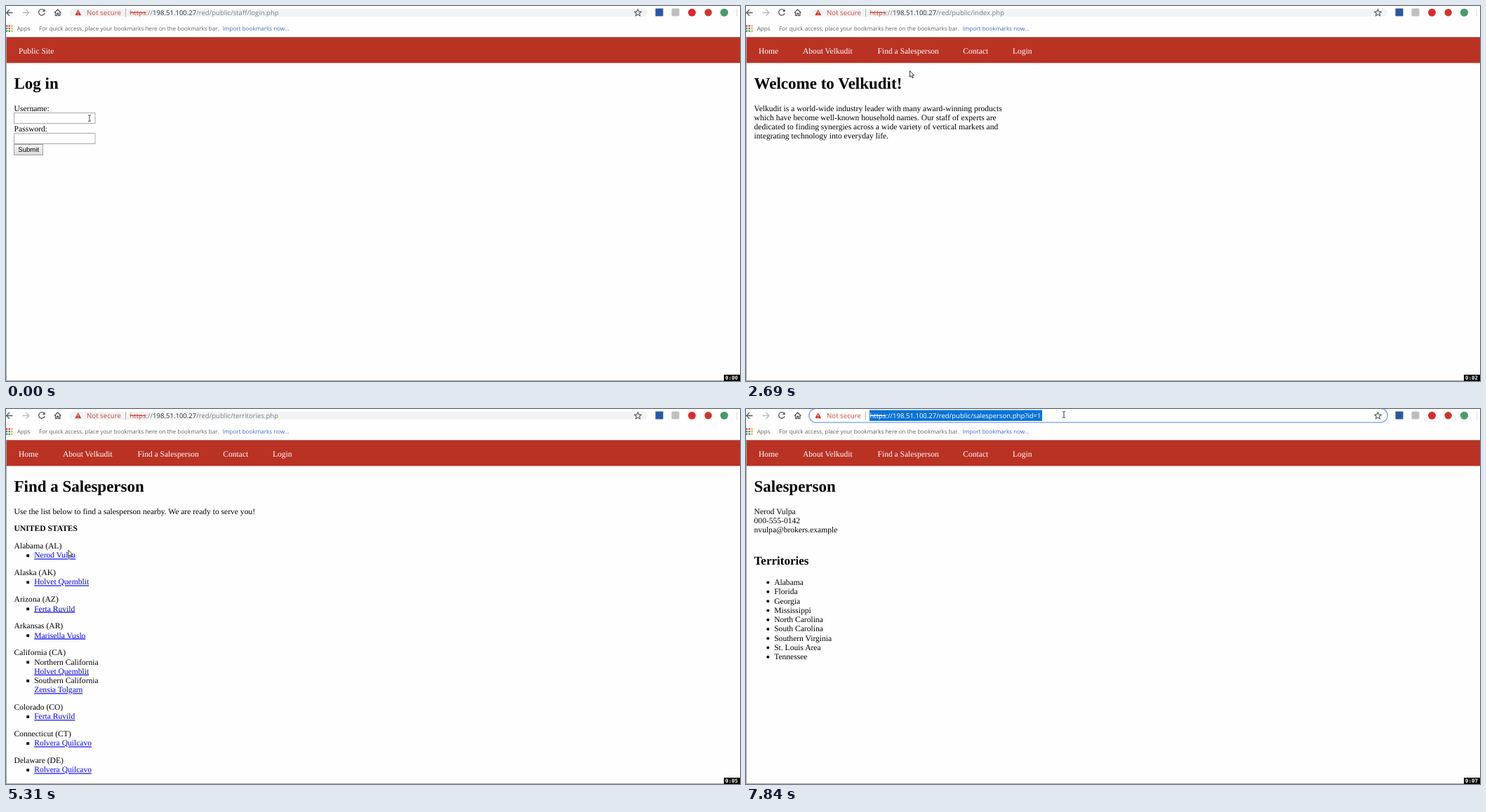
Write an HTML page that moves like this. It is 1046 px wide and 535 px high and loops after 8000 ms.

```html
<!DOCTYPE html>
<html lang="en">
<head>
<meta charset="utf-8">
<title>Browsing session</title>
<style>
  html, body { margin: 0; width: 100%; height: 100%; overflow: hidden; background: #fefefe; }
  svg { display: block; width: 1046px; height: 535px; text-rendering: geometricPrecision; }
  .page text { font: 11.55px "Liberation Serif", serif; fill: #000; }
  .page .h1 { font-size: 23px; font-weight: bold; }
  .page .h2 { font-size: 17px; font-weight: bold; }
  .page .bold { font-weight: bold; }
  .page .nav { fill: #fff; }
  .page .link { fill: #00e; text-decoration: underline; }
  .page .button { font: 9.6px "Liberation Sans", sans-serif; }
  .ui text { font: 8.12px "Open Sans", sans-serif; fill: #5f6368; }
  .ui .address { font-size: 9.55px; fill: #7b7f83; }
  .ui .address.selected tspan, .ui .address.selected { fill: #fff; }
  .ui .warn { font-size: 9.7px; fill: #d0463b; }
  .scheme { fill: #d0463b; text-decoration: line-through; }
  .host { fill: #303236; }
  .icon { fill: none; stroke: #55585c; stroke-width: 1.3; }
  #clock { font: bold 7.5px "DejaVu Sans Mono", monospace; fill: #fff; }
</style>
</head>
<body>
<svg viewBox="0 0 1046 535">
  <defs>
    <linearGradient id="face" x2="0" y2="1"><stop stop-color="#f6f6f6"/><stop offset="1" stop-color="#dcdcdc"/></linearGradient>
  </defs>
  <rect width="1046" height="535" fill="#fefefe"/>

  <g class="ui">
    <rect x="90" y="4" width="824" height="11" rx="5.5" fill="#f2f3f4" id="field"/>
    <rect x="89.8" y="-.8" width="824.4" height="20" rx="10" fill="#fff" stroke="#8ab0ec" stroke-width="1.6" id="ring"/>
    <rect x="176" y="1.5" width="246" height="15.5" fill="#0a74d6" id="selection"/>
    <path class="icon" d="M9.500 9.500H.8M5 5L.6 9.500L5 14"/>
    <path class="icon" d="M23.500 9.500H32.500M28.500 5L32.800 9.500L28.500 14" style="stroke:#b9bbbe"/>
    <g class="icon" id="reload"><path d="M54.300 6.300A4.300 4.300 0 1 0 55 10.300"/><path d="M55.600 4.300V8.300H51.600Z" fill="#55585c" stroke="none"/></g>
    <path class="icon" id="stop" d="M47 5.500L54.800 13.300M54.800 5.500L47 13.300"/>
    <path class="icon" d="M69 9.700L73.700 5L78.400 9.700M70.500 9V13.700H72.700V10.500H74.700V13.700H76.900V9"/>
    <path d="M102.800 5L107.300 13.300H98.300Z" fill="#cf352b"/>
    <path d="M102.800 7.800V10.300M102.800 11.200V12.300" stroke="#fff"/>
    <text class="warn" x="115" y="12.900">Not secure</text>
    <path d="M170.500 3.500V15.500" stroke="#b4b4b4"/>
    <text class="address" id="address" x="176.500" y="12.800"><tspan class="scheme">https</tspan>://<tspan class="host">198.51.100.27</tspan>/red/public/<tspan id="path"></tspan></text>
    <path class="icon" style="stroke-width:1.100" d="M900.500 4.600L901.900 7.900L905.300 8.200L902.700 10.500L903.500 13.900L900.500 12.100L897.500 13.900L898.300 10.500L895.700 8.200L899.100 7.900Z"/>
    <rect x="925.500" y="3.500" width="11" height="11" fill="#2b57a0"/>
    <rect x="948.500" y="3.500" width="11" height="11" rx="1.500" fill="#bfbfbf"/>
    <circle cx="977.500" cy="9.300" r="5.500" fill="#d82a33"/>
    <circle cx="1000.700" cy="9.300" r="5.200" fill="#c7392f"/>
    <circle cx="1023.500" cy="9.300" r="5.600" fill="#4c9a6b"/>
    <path d="M1041.500 4V15" stroke="#dcdcdc"/>
    <g id="apps"></g>
    <text x="15.700" y="35">Apps</text>
    <text x="47" y="35">For quick access, place your bookmarks here on the bookmarks bar.</text>
    <text x="308.700" y="35" style="fill:#3a6bc4">Import bookmarks now...</text>
  </g>

  <rect y="44" width="1046" height="37.300" fill="#ba3224"/>
  <path d="M0 44.500H1046" stroke="#a8847e"/>
  <g id="pages"></g>
  <path d="M.5 45V535M0 534.500H1046" stroke="#a6a6a6" fill="none"/>

  <rect x="1023" y="526" width="23" height="9"/>
  <text id="clock" x="1025" y="532.800"></text>

  <g id="cursors" stroke="#222" stroke-width=".9" fill="#fff">
    <path id="arrow" d="M.4 .4V9.200L2.400 7.400L3.900 10.700L5.300 10L3.900 6.900H6.600Z"/>
    <path id="hand" d="M2 .4Q3 .4 3 1.400V4.600L7 5.500Q8 5.800 8 6.800L7.400 10V11.600H2.600V10.300L.4 7.400Q0 5.800 1.100 6.100V1.400Q1.100 .4 2 .4Z"/>
    <path id="ibeam" fill="none" d="M-2 -4.300H-.6L0 -3.700L.6 -4.300H2M0 -3.700V3.700M-2 4.300H-.6L0 3.700L.6 4.300H2"/>
  </g>
</svg>
<script>
const $ = id => document.getElementById(id);
const text = (x, y, str, cls = '') => `<text x="${x}" y="${y}" class="${cls}">${str}</text>`;
const lines = (y, step, list) => list.map((str, i) => text(11.6, y + i * step, str)).join('');
const title = str => text(11.5, 118, str, 'h1');
const LINE = 13.27, INDENT = 40.2;

const nav = [[18, 'Home'], [81, 'About Velkudit'], [187.5, 'Find a Salesperson'], [309.3, 'Contact'], [380, 'Login']]
  .map(([x, str]) => text(x, 67.6, str, 'nav')).join('');

const input = y => `<rect x="11.500" y="${y}" width="115.500" height="15" fill="#fff" stroke="#a9a9a9"/>`;
const login = text(18, 67.6, 'Public Site', 'nav') + title('Log in') +
  text(11.6, 149.6, 'Username:') + input(152.5) + text(11.6, 179, 'Password:') + input(181.5) +
  '<rect x="11.500" y="197.500" width="41" height="15" fill="url(#face)" stroke="#a0a0a0"/>' +
  text(17.3, 208.2, 'Submit', 'button');

const home = nav + title('Welcome to Velkudit!') + lines(149.6, LINE, [
  'Velkudit is a world-wide industry leader with many award-winning products',
  'which have become well-known household names. Our staff of experts are',
  'dedicated to finding synergies across a wide variety of vertical markets and',
  'integrating technology into everyday life.']);

// Each state: name, then people, optionally prefixed by an area.
const states = [
  ['Alabama (AL)', 'Nerod Vulpa'], ['Alaska (AK)', 'Holvet Quemblit'], ['Arizona (AZ)', 'Ferta Ruvild'],
  ['Arkansas (AR)', 'Marisella Vuslo'],
  ['California (CA)', 'Northern California/Holvet Quemblit', 'Southern California/Zensia Tolgarn'],
  ['Colorado (CO)', 'Ferta Ruvild'], ['Connecticut (CT)', 'Rolvera Quilcavo'], ['Delaware (DE)', 'Rolvera Quilcavo']];

function stateList() {
  let y = 199.2, out = '';
  for (const [name, ...entries] of states) {
    out += text(11.6, y, name);
    for (const entry of entries) {
      out += `<rect x="29.300" y="${y + LINE - 5.1}" width="3.800" height="3.800"/>`;
      const parts = entry.split('/');
      parts.forEach((part, i) => out += text(INDENT, y += LINE, part, i === parts.length - 1 ? 'link' : ''));
    }
    y += 24.75;
  }
  return out;
}
const territories = nav + title('Find a Salesperson') +
  text(11.6, 149.6, 'Use the list below to find a salesperson nearby. We are ready to serve you!') +
  text(11.6, 174.2, 'UNITED STATES', 'bold') + stateList();

const areas = ['Alabama', 'Florida', 'Georgia', 'Mississippi', 'North Carolina', 'South Carolina',
  'Southern Virginia', 'St. Louis Area', 'Tennessee'];
const person = nav + title('Salesperson') +
  lines(149.6, LINE, ['Nerod Vulpa', '000-555-0142', 'nvulpa@brokers.example']) +
  text(11.6, 222, 'Territories', 'h2') +
  areas.map((area, i) => `<circle cx="31.300" cy="${247.6 + i * LINE}" r="2"/>` + text(INDENT, 251 + i * LINE, area)).join('');

const pages = { login, home, territories, person };
$('pages').innerHTML = Object.entries(pages)
  .map(([id, body]) => `<g class="page" id="${id}">${body}</g>`).join('');

const dots = ['#d9473b', '#d9473b', '#e8b23a', '#4a9a58', '#4878c8', '#e8b23a', '#4a9a58', '#4a9a58', '#e8b23a'];
$('apps').innerHTML = dots.map((color, i) =>
  `<rect x="${i % 3 * 3.6}" y="${27.3 + (i / 3 | 0) * 3.6}" width="2.400" height="2.400" fill="${color}"/>`).join('');

const at = (x, y, cursor = 'arrow') => ({ x, y, cursor });
const steps = [
  [0, { ...at(119, 160, 'ibeam'), page: 'login', path: 'staff/login.php', loading: false, ring: 0, selected: false }],
  [130, at(65, 93)], [310, at(57, 77)], [450, at(51, 66)], [575, at(50, 56)], [700, at(54.5, 61)],
  [840, { loading: true }], [1200, { path: 'index.php' }], [1660, { page: 'home', loading: false }],
  [2120, at(68, 72)], [2260, at(150, 120)], [2390, at(230, 151)], [2690, at(233, 92)], [2820, at(233, 85)],
  [2960, at(232, 76)], [3090, at(232, 65, 'hand')], [3310, at(232.5, 65, 'hand')],
  [3450, { loading: true }], [3570, { path: 'territories.php' }], [4010, { page: 'territories', loading: false }],
  [4670, at(165, 125)], [4790, at(97, 186)], [5060, at(94, 190)], [5160, at(92, 193)],
  [5310, at(88.5, 201)], [5450, at(86, 207, 'hand')],
  [5860, { loading: true, path: 'salesperson.php?id=1' }],
  [6390, { ...at(230.5, 156), page: 'person', loading: false }], [6520, at(238, 153)],
  [6820, at(345, 90)], [6940, at(439, 34)], [7220, at(453, 8, 'ibeam')],
  [7340, { ring: .3 }], [7590, { ring: .6, selected: true }], [7715, { ring: .85 }], [7840, { ring: 1 }]];
const ticks = [940, 1970, 2990, 4110, 5060, 6140, 7220];

const show = (id, on) => $(id).style.display = on ? '' : 'none';

function draw(time) {
  const s = Object.assign({}, ...steps.filter(([start]) => start <= time).map(([, change]) => change));
  for (const id in pages) show(id, id === s.page);
  for (const id of ['arrow', 'hand', 'ibeam']) show(id, id === s.cursor);
  $('cursors').setAttribute('transform', `translate(${s.x} ${s.y})`);
  show('stop', s.loading);
  show('reload', !s.loading);
  show('selection', s.selected);
  $('address').classList.toggle('selected', s.selected);
  $('ring').style.opacity = s.ring;
  $('path').textContent = s.path;
  $('clock').textContent = '0:0' + ticks.filter(tick => tick <= time).length;
}

const start = performance.now();
(function frame() {
  draw((performance.now() - start) % 8000);
  requestAnimationFrame(frame);
})();
</script>
</body>
</html>
```
